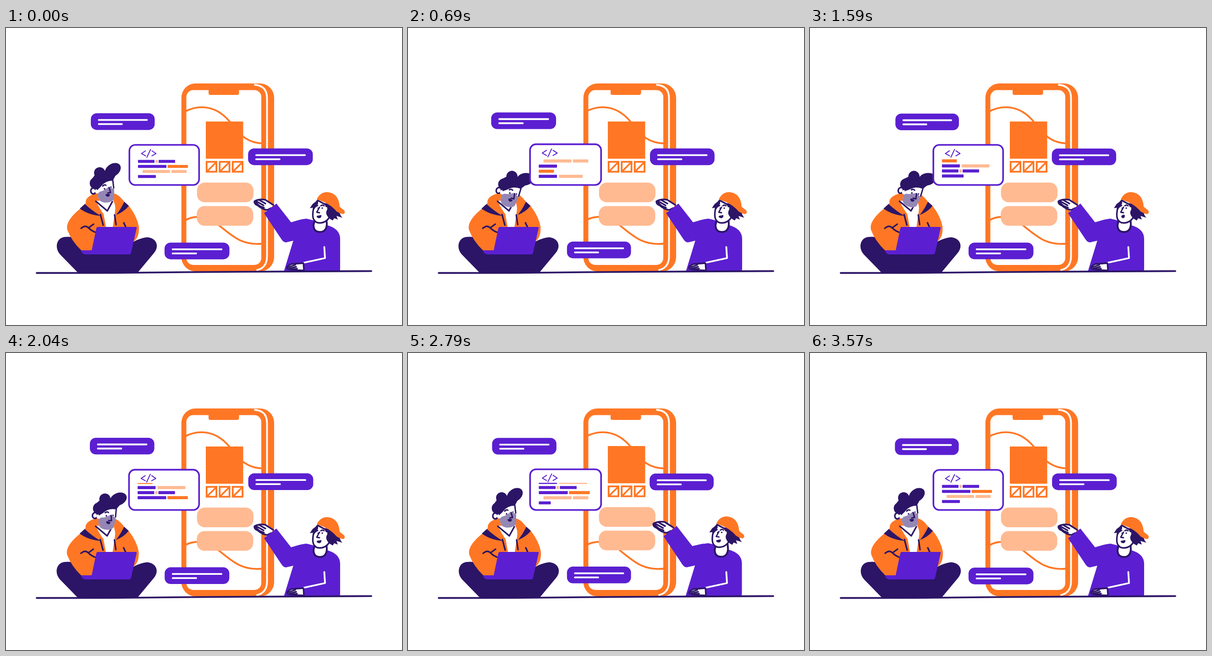
An HTML page for the animation above (3600 ms loop, 864 by 648 pixels).

```html
<!DOCTYPE html>
<html lang="en">
<head>
<meta charset="utf-8">
<title>App building</title>
<style>
  html, body { margin: 0; width: 100%; height: 100%; overflow: hidden; background: #fff; }
  svg { display: block; width: 864px; height: 648px; fill: none; stroke-linecap: round; stroke-linejoin: round; }
  .o { fill: #ff7724; } .p { fill: #5b1fd1; } .d { fill: #2c1566; }
  .w { fill: #fff; } .l { fill: #ffba92; } .b { fill: #9487b5; }
  .so { stroke: #ff7724; stroke-width: 3.8; }
  .sd { stroke: #2c1566; stroke-width: 3.4; }
  .sw { stroke: #fff; stroke-width: 3.8; }
  .sp { stroke: #5b1fd1; stroke-width: 3.6; }
</style>
</head>
<body>
<svg viewBox="0 0 864 648">
  <defs>
    <clipPath id="page"><rect x="272" y="284" width="147" height="56"/></clipPath>
    <g id="bubble">
      <rect class="p" x="-70.3" y="-18.2" width="140.6" height="36.4" rx="13"/>
      <path class="sw" d="M-52.8-3.6H53.2M-52.8 5.4H-1.8"/>
    </g>
    <g id="box" class="so"><rect x="437.700" y="292" width="21.400" height="21.600" stroke-linejoin="miter"/><path d="M440 311.500L457 294.500"/></g>
  </defs>

  <!-- phone -->
  <rect class="o" x="382.700" y="121" width="202.300" height="410" rx="31"/>
  <rect class="w" x="393.500" y="135.500" width="163.500" height="381.500" rx="15"/>
  <path class="sw" d="M543 124Q569.500 126 569.500 153V499Q569 523 548 528"/>
  <path class="o" d="M442 134H508.500V142Q508 146 504 146H446Q442 146 442 142Z"/>
  <g id="curves" class="so">
    <path d="M390 182.500C418 168 456 166 488 204C512 237 530 252 564 252M390 420Q404 412 420 412M464 430C492 452 515 477 564 470"/>
  </g>
  <g id="content">
    <rect class="o" x="436" y="204" width="81.500" height="81.200"/>
    <use href="#box"/><use href="#box" x="28.500"/><use href="#box" x="57"/>
    <rect class="l" x="416.700" y="337.200" width="123.300" height="43" rx="17"/>
    <rect class="l" x="416.200" y="388.500" width="123.300" height="43" rx="17"/>
  </g>

  <!-- developer -->
  <g id="sitter">
    <path class="d" d="M157 534L118 494C106 481 109 459 127 456C150 453 165 462 190 475L272 470C285 462 298 457 309 456.500C330 459 335 478 322 492L287 534Z"/>
    <path class="o" d="M196 361Q172 368 174 382L161 395Q128 422 134 441Q143 465 165 486L268 490L278 466Q291 458 290 434Q286 411 268 388L258 379Q246 363 236 361Z"/>
    <path class="d" d="M161 394L172 384Q188 399 207 410Q180 408 161 394ZM258 379L268 388Q258 401 240 408Q251 395 258 379Z"/>
    <path class="w" d="M196 377Q204 394 213 406L218 434H233L238 400Q240 388 234 376Z"/>
    <path class="sd" d="M196 378L221 399L232 379M206 407L212 430M237 408L240 429M164 437Q173 429 180 436T196 446M180 436L191 428M257 425L262 436"/>
  </g>
  <path class="p" d="M200 434H283Q286 434 285 437L273 490Q272 494 268 494H172Q165 493 164 485H187L197 437Q198 434 200 434Z"/>
  <g id="devHead">
    <path class="w" d="M199 335L233 330L236 372Q232 381 216 381Q203 380 201 368Z"/>
    <path class="b" d="M199 358Q213 357 223 347L236 351V372Q232 381 216 381Q203 380 201 368Z"/>
    <ellipse class="w sd" cx="190.500" cy="355.500" rx="5.500" ry="6.500"/>
    <circle class="w" cx="199" cy="356" r="5"/>
    <path class="d" d="M186 331L204 308L240 320L233 333Q217 333 208 345L199 354Z"/>
    <circle class="d" cx="195.700" cy="338.700" r="13"/>
    <circle class="d" cx="204.300" cy="316" r="12.200"/>
    <ellipse class="d" cx="233" cy="310" rx="19" ry="13.500" transform="rotate(-35 233 310)"/>
    <path class="sd" style="stroke-width:3" d="M233 332L235 349M211 345Q214 341 218 343M225 348L228 359L222 360"/>
    <circle class="d" cx="215" cy="351" r="1.800"/><circle class="d" cx="229" cy="347" r="1.600"/>
    <path class="d" d="M217 363Q222 361 227 363Q226 368 222 368Q218 368 217 363Z"/>
  </g>

  <!-- code window -->
  <g id="code">
    <rect class="w sp" x="269.300" y="255" width="152" height="87.500" rx="13"/>
    <path class="sp" style="stroke-width:2" d="M304.500 268L295.500 274L304.500 279M315.500 265L307.500 282M318.500 268L327.500 274L318.500 279"/>
    <g clip-path="url(#page)"><g id="rows"></g></g>
  </g>

  <use id="topBubble" href="#bubble"/>
  <use id="rightBubble" href="#bubble"/>
  <use id="lowBubble" href="#bubble"/>

  <!-- presenter -->
  <path id="body" class="p" d="M606 532L628 460L616 426Q645 416 656 416L672 420L700 430Q729 438 729 460V526Q729 532 724 532Z"/>
  <g id="arm">
    <path class="w sd" d="M583 386L566 375Q553 372 542 378Q541 384 549 387Q559 396 570 397L578 393"/>
    <path class="sd" d="M543 379L553 388L563 392M546 378L562 387M552 375L566 383"/>
    <path class="p" d="M563 404L590 383L622 424L645 419L636 462L614 467Q607 470 601 461Z"/>
  </g>
  <path class="sw" d="M694.500 478L696 502L650 512"/>
  <path class="w sd" d="M649 513L623 515Q611 520 614 525Q622 528 650 529Z"/>
  <path class="sd" d="M616 522L631 517M618 525L633 521M624 527L635 525"/>
  <path id="collar" class="w sd" style="stroke-width:4" d="M673 421L671 430Q671 445 685 445Q699 445 700 428L699 416"/>
  <g id="capHead">
    <path class="w sd" d="M673 385Q667 408 671 417Q676 427 688 425Q698 424 705 414L702 388L680 376Z"/>
    <path class="d" d="M681 375L669 384L663 393L671 392V398L681 383ZM694 382L698 391L704 391Q697 400 699 406Q702 415 713 420L716 415L724 418L721 410L734 414Q728 408 727 397L712 384Z"/>
    <path class="o" d="M678 374Q685 358 701 358Q726 360 728 390L738 398Q741 403 736 406Q728 405 721 400Q706 382 678 374Z"/>
    <path class="sd" style="stroke-width:2.800" d="M675 390L680 387M687 388Q690 385 694 388M684 391L678 402L684 403"/>
    <circle class="d" cx="681" cy="393" r="1.500"/><circle class="d" cx="690" cy="393" r="1.700"/>
    <path id="mouth" class="d"/>
  </g>

  <path class="sd" style="stroke-width:3.800" d="M67 534.500L230 534.300L400 532.600L797 530.300"/>
</svg>
<script>
const LOOP = 3600, SWAY = 1800;
const $ = id => document.getElementById(id);
const clamp = (v, lo = 0, hi = 1) => Math.min(hi, Math.max(lo, v));
const ease = (t, a, b) => { const u = clamp((t - a) / (b - a)); return u * u * (3 - 2 * u); };
const wave = (t, peak) => Math.cos(2 * Math.PI * (t - peak) / SWAY);
const move = (id, value) => $(id).setAttribute('transform', value);

// each code line: [x, width, colour class] per segment
const lines = [
  [[288, 36, 'p'], [326, 5, 'l'], [333, 36, 'p']],
  [[288, 62, 'p'], [352.5, 44.5, 'o']],
  [[298, 60, 'l'], [361, 33, 'l']],
  [[288, 39, 'p']],
  [[288, 32.5, 'o']],
  [[288, 39, 'p'], [331, 60.5, 'l']]
];
const typeStart = [30, 430, 900, 1460, 2150, 2720];
const scrollKeys = [[0, 0], [690, 2], [990, 3.17], [1590, 4.1], [2430, 5.3], [3050, 6], [LOOP, 6]];

const segments = [];
for (let row = 0; row < 10; row++) {
  for (const [x, width, color] of lines[row % 6]) {
    const el = document.createElementNS('http://www.w3.org/2000/svg', 'rect');
    for (const [key, value] of Object.entries({ class: color, x, height: 6.6, rx: 1 })) el.setAttribute(key, value);
    $('rows').append(el);
    segments.push({ el, row, x, width });
  }
}

function scrollAt(t) {
  const i = scrollKeys.findIndex(key => key[0] > t);
  const [t0, s0] = scrollKeys[i - 1], [t1, s1] = scrollKeys[i];
  return s0 + (s1 - s0) * (t - t0) / (t1 - t0);
}

function drawCode(t) {
  const scroll = scrollAt(t);
  for (const { el, row, x, width } of segments) {
    const typed = row < 4 ? 999 : (t - typeStart[row - 4]) * 0.36;
    el.setAttribute('y', 287.7 + (row - scroll) * 11);
    el.setAttribute('width', clamp(288 + typed - x, 0, width));
  }
}

function placeBubble(id, x, y, width) {
  move(id, `translate(${x} ${y}) scale(${width / 140.6} 1)`);
}

function draw(t) {
  const a = wave(t, 1485), b = wave(t, 300), c = wave(t, 1720);
  placeBubble('topBubble', 253.95 + 1.8 * a, 203.6 + 1.35 * a, 140.1 - 1.6 * a);
  placeBubble('rightBubble', 598.1 + 1.4 * b, 281.1 - 0.3 * b, 140.6 + 1.2 * b);
  placeBubble('lowBubble', 416.7, 485.3 + 1.2 * c, 140.6 + c);
  move('curves', `translate(${1.4 * (c - 1)} 0)`);

  const grow = 1 + 0.0105 * (1 - c);
  move('code', `translate(422.5 343.5) scale(${grow} ${1 + 0.008 * (1 - c)}) translate(-422.5 -343.5)`);
  drawCode(t);

  const turn = ease(t, 60, 600) - ease(t, 1750, 2330);
  const recoil = ease(t, 2200, 2380) - ease(t, 2400, 2700);
  move('devHead', `translate(${0.8 * turn} ${1.8 * turn}) rotate(${24 * turn - 1.7 * recoil} 201 370)`);
  move('sitter', `translate(${-0.7 * turn} 0)`);

  const lean = ease(t, 2160, 2760) - ease(t, 3180, 3560);
  move('content', `translate(0 ${-lean})`);
  move('body', `translate(${-0.5 * lean} ${-lean})`);
  move('arm', `translate(650 470) scale(${1 + 0.062 * lean}) translate(-650 -470)`);
  move('collar', `translate(${-1.8 * lean} ${-0.5 * lean})`);
  move('capHead', `translate(${-5.5 * lean} ${-1.6 * lean})`);

  const round = Math.max(0, 1 - Math.abs(t - 300) / 200, 1 - Math.abs(t - 1560) / 200);
  const half = 5 - 1.6 * round, top = 409 - 3 * round;
  $('mouth').setAttribute('d',
    `M${683 - half} 410Q683 ${top} ${683 + half} 408Q${684 + half} 415 683 415Q${682 - half} 414 ${683 - half} 410Z`);
}

function tick() {
  draw(performance.now() % LOOP);
  requestAnimationFrame(tick);
}
tick();
</script>
</body>
</html>
```
